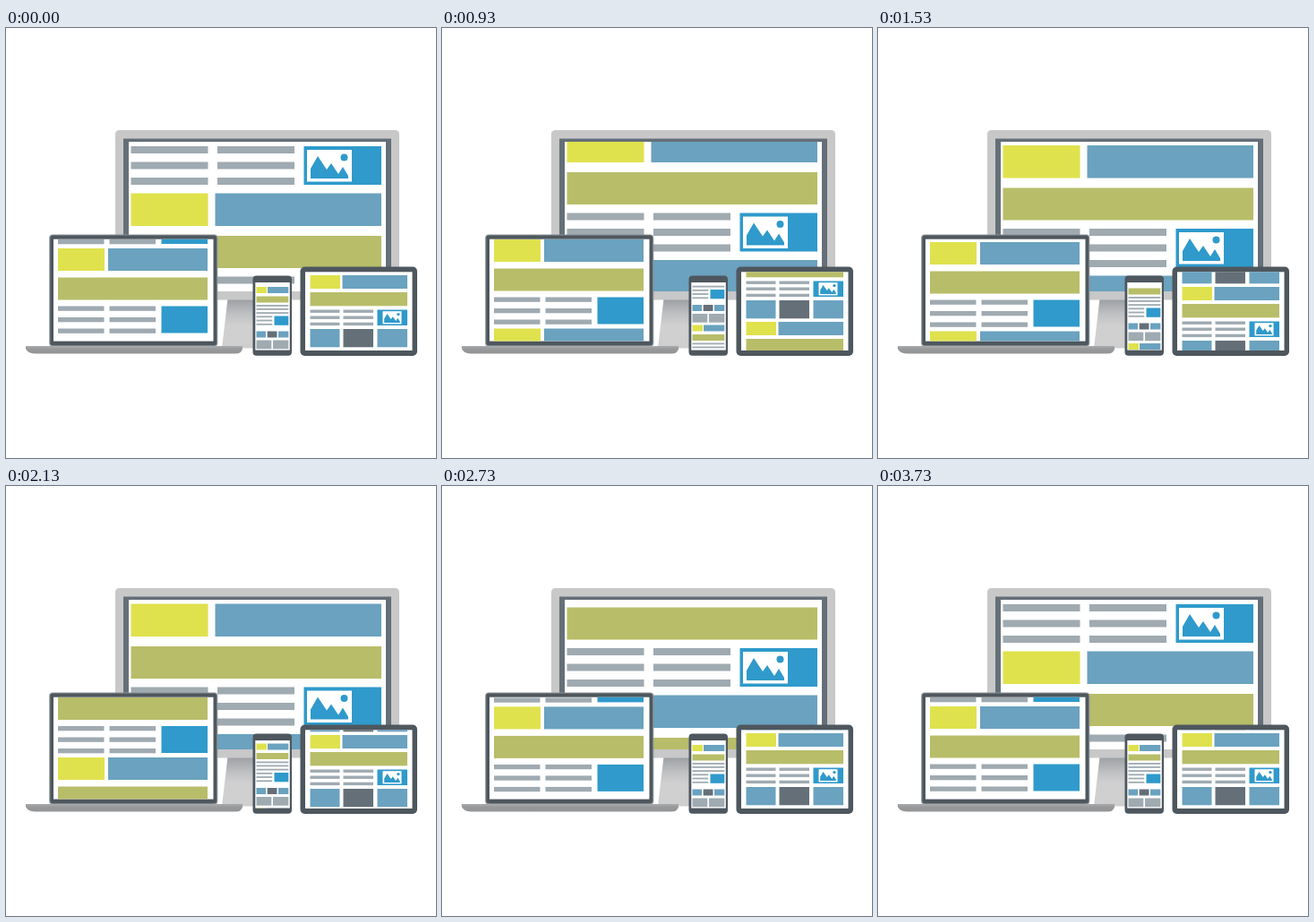
Write an HTML page that moves like this. It is 480 px wide and 480 px high and loops after 4.07 s.

```html
<!DOCTYPE html>
<html lang="en">
<head>
<meta charset="utf-8">
<title>Responsive devices</title>
<style>
  html, body { margin: 0; width: 100%; height: 100%; overflow: hidden; background: #fff; }
  svg { display: block; width: 100vw; height: 100vh; }
</style>
</head>
<body>
<svg id="stage" viewBox="0 0 480 480">
  <defs>
    <linearGradient id="neck" x1="0" y1="0" x2="0" y2="1">
      <stop offset="0" stop-color="#9b9ea2"/>
      <stop offset=".32" stop-color="#c0c1c3"/>
      <stop offset=".55" stop-color="#d0d0d1"/>
      <stop offset="1" stop-color="#cfcfd0"/>
    </linearGradient>
    <linearGradient id="base" x1="0" y1="0" x2="0" y2="1">
      <stop offset="0" stop-color="#aaabad"/>
      <stop offset=".4" stop-color="#97999b"/>
      <stop offset="1" stop-color="#929496"/>
    </linearGradient>
  </defs>
</svg>
<script>
const NS = 'http://www.w3.org/2000/svg';
const stage = document.getElementById('stage');
const C = {
  yellow: '#dfe24d', blue: '#6aa2bf', green: '#b8bd69', pic: '#2f9acb',
  text: '#9faab1', slate: '#656f78', frame: '#4e575e', rim: '#8b9196',
  shell: '#c8c8c9', white: '#fff'
};

function add(parent, tag, attrs) {
  const el = document.createElementNS(NS, tag);
  for (const key in attrs) el.setAttribute(key, attrs[key]);
  return parent.appendChild(el);
}

// Rectangle given by its left, right, top and height
function box(parent, x0, x1, y, height, fill, rx = 0) {
  return add(parent, 'rect', { x: x0, y, width: x1 - x0, height, fill, rx });
}

function lines(parent, x0, x1, tops, height) {
  tops.forEach(y => box(parent, x0, x1, y, height, C.text));
}

// Picture icon drawn in a 50 x 35.5 card
function icon(parent, x, y, sx, sy) {
  const g = add(parent, 'g', { transform: `translate(${x} ${y}) scale(${sx} ${sy})` });
  box(g, 0, 50, 0, 35.5, C.white);
  add(g, 'path', {
    d: 'M4 32V21L12 7L22 22L27 15L35 27L40 19L46 29V32Z', fill: C.pic
  });
  add(g, 'circle', { cx: 41.5, cy: 8.5, r: 4, fill: C.pic });
}

const pages = {
  monitor(g) {
    box(g, 139.5, 225.5, 184.5, 36.5, C.yellow);
    box(g, 233.5, 419, 184.5, 36.5, C.blue);
    box(g, 139.5, 419, 232, 36, C.green);
    const tops = [277.5, 295, 312.5];
    lines(g, 139.5, 225.5, tops, 8);
    lines(g, 236, 322, tops, 8);
    box(g, 332.5, 419, 277.5, 43, C.pic);
    icon(g, 336, 281.5, 1, 1);
  },
  laptop(g) {
    box(g, 58, 110, 246, 25, C.yellow);
    box(g, 114, 225, 246, 25, C.blue);
    box(g, 58, 225, 278.5, 25, C.green);
    const tops = [310.5, 323, 335.5];
    lines(g, 58, 109.5, tops, 5.3);
    lines(g, 115.5, 167, tops, 5.3);
    box(g, 173.5, 225, 310.5, 30, C.pic);
  },
  tablet(g) {
    box(g, 339.5, 373, 276, 15, C.yellow);
    box(g, 375.5, 448, 276, 15, C.blue);
    box(g, 339.5, 448, 295, 15.3, C.green);
    const tops = [314.5, 321.5, 328.7];
    lines(g, 339.5, 372.5, tops, 3.4);
    lines(g, 376.5, 410, tops, 3.4);
    box(g, 414.5, 448, 314.5, 17.5, C.pic);
    icon(g, 420.5, 316.2, .42, .4);
    box(g, 339.5, 372.5, 336, 20.3, C.blue);
    box(g, 376.5, 410, 336, 20.3, C.slate);
    box(g, 414.5, 448, 336, 20.3, C.blue);
  },
  phone(g) {
    box(g, 279.5, 291, 289, 7, C.yellow);
    box(g, 292, 315.3, 289, 7, C.blue);
    box(g, 279.5, 315.3, 299.5, 7, C.green);
    lines(g, 279.5, 315.3, [309, 313, 317.2], 1.8);
    lines(g, 279.5, 297.3, [321.4, 325.6, 329.9], 1.8);
    box(g, 299.5, 315.3, 321.5, 10.3, C.pic);
    box(g, 279.5, 290, 338.5, 7, C.blue);
    box(g, 291.7, 302.5, 338.5, 7, C.slate);
    box(g, 304, 315.3, 338.5, 7, C.blue);
    box(g, 279.5, 296.3, 348.5, 9.7, C.text);
    box(g, 298, 315.3, 348.5, 9.7, C.text);
  }
};

// White screen holding stacked copies of a page; returns the scrolling group
function screen(name, [x0, x1, y0, y1], period, copies, pad = 0) {
  const clip = add(stage.querySelector('defs'), 'clipPath', { id: name });
  box(clip, x0, x1, y0 + pad, y1 - y0 - pad, '#000');
  box(stage, x0, x1, y0, y1 - y0, C.white);
  const view = add(stage, 'g', { 'clip-path': `url(#${name})` });
  const scroll = add(view, 'g', {});
  copies.forEach(n => {
    pages[name](add(scroll, 'g', { transform: `translate(0 ${n * period})` }));
  });
  return scroll;
}

// Desktop monitor
add(stage, 'path', { d: 'M247.5 302H312L316 357.5H241Z', fill: 'url(#neck)' });
box(stage, 122, 439, 114, 189.5, C.shell, 4.5);
box(stage, 131, 430, 123.5, 170.5, C.slate);
const monitor = screen('monitor', [137, 424, 127, 294], 145.5, [-1, 0]);

// Laptop
box(stage, 48.2, 236.3, 230.5, 125, C.rim, 4);
box(stage, 49.4, 235.1, 231.6, 122.6, C.frame, 3);
const laptop = screen('laptop', [53, 231.5, 235.7, 349.6], 99.5, [-2, -1, 0]);
add(stage, 'path', {
  d: 'M22 355H264V358Q263 363.5 256 363.5H32Q24 363 22 358Z', fill: 'url(#base)'
});

// Phone
box(stage, 275.5, 319, 276.5, 89.3, C.frame, 4);
const phone = screen('phone', [278.3, 316.8, 284, 359.6], 72, [-1, 0], 3);

// Tablet
box(stage, 328.5, 459, 266.5, 99.5, C.frame, 5);
const tablet = screen('tablet', [334, 453.5, 272.3, 360], 84, [0, 1]);

// Smooth monotone curve through [step, offset] keys, at rest at both ends
function curve(keys) {
  const slope = (a, b) => (b[1] - a[1]) / (b[0] - a[0]);
  const m = keys.map((k, i) => {
    if (!i || i === keys.length - 1) return 0;
    const p = slope(keys[i - 1], k), q = slope(k, keys[i + 1]);
    return p * q > 0 ? 2 * p * q / (p + q) : 0;
  });
  return s => {
    if (s <= keys[0][0]) return keys[0][1];
    const i = keys.findIndex(k => k[0] >= s);
    if (i < 0) return keys[keys.length - 1][1];
    const [t0, a] = keys[i - 1], [t1, b] = keys[i];
    const h = t1 - t0, u = (s - t0) / h, v = 1 - u;
    return a * v * v * (1 + 2 * u) + b * u * u * (3 - 2 * u)
      + h * u * v * (m[i - 1] * v - m[i] * u);
  };
}

const tracks = [
  [monitor, curve([[0, 0], [7, 19], [14, 74.5], [23, 92], [32, 92.5], [41, 49], [50, 2], [56, 0]])],
  [laptop, curve([[0, 0], [7, 71.5], [14, 89.5], [23, 92.5], [32, 57], [41, .4], [48, 0]])],
  [tablet, curve([[7, 0], [14, -32], [23, -71], [32, -82], [41, -84]])],
  [phone, curve([[7, 0], [14, 42.5], [23, 63], [32, 70.5], [41, 72]])]
];

const LOOP = 4070, STEP = 1000 / 15, LAST = 56;
const SLACK = 3.4; // step times are rounded to 10 ms

function render(ms) {
  const step = Math.min(LAST, Math.floor((ms % LOOP + SLACK) / STEP));
  for (const [el, at] of tracks) {
    el.setAttribute('transform', `translate(0 ${at(step).toFixed(2)})`);
  }
}

const start = performance.now();
function tick() {
  render(performance.now() - start);
  requestAnimationFrame(tick);
}
tick();
</script>
</body>
</html>
```
